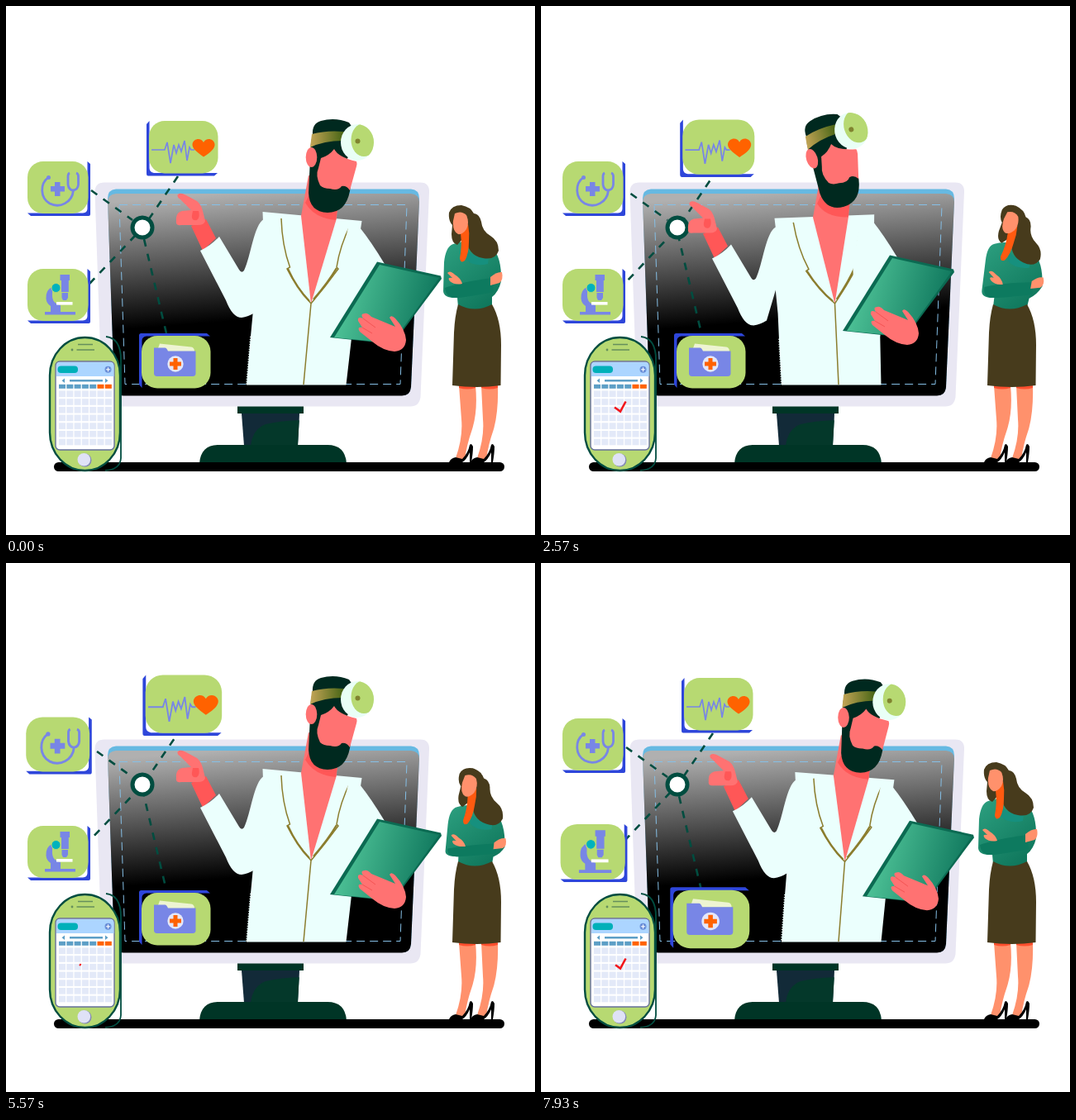
An HTML page that plays this animation: 640 px wide and 640 px high, repeating every 8 s.

```html
<!DOCTYPE html>
<html lang="en">
<head>
<meta charset="utf-8">
<title>Online doctor</title>
<style>
  html, body { margin: 0; width: 100%; height: 100%; overflow: hidden; background: #fff; }
  svg { display: block; width: 100vw; height: 100vh; }
  .link { fill: none; stroke: #004d40; stroke-width: 2.6; stroke-dasharray: 9 9; }
  .card { fill: #b7d972; }
  .edge { fill: #2e46da; }
  .ink { fill: #7886e6; }
  .line { fill: none; stroke: #7886e6; }
  .coat { fill: #ebfffd; }
  .seam { fill: none; stroke: #8b7d2e; stroke-width: 1.5; }
  .skin { fill: #ff7272; }
  .deep { fill: #ff5757; }
  .hair { fill: #00291f; }
  .brown { fill: #473b1c; }
  .peach { fill: #ff916c; }
  .orange { fill: #ff6200; }
  .pine { fill: #003526; }
</style>
</head>
<body>
<svg viewBox="0 0 640 640">
  <defs>
    <linearGradient id="screen" gradientUnits="userSpaceOnUse" x1="300" y1="224" x2="312" y2="378">
      <stop stop-color="#b0b0b0"/><stop offset="1"/>
    </linearGradient>
    <linearGradient id="board" x1="0" x2="1" y1=".4" y2=".6">
      <stop offset=".1" stop-color="#4cc095"/><stop offset="1" stop-color="#0c735a"/>
    </linearGradient>
    <linearGradient id="band">
      <stop stop-color="#c4a557"/><stop offset="1" stop-color="#456414"/>
    </linearGradient>
    <linearGradient id="knit" x1="0" y1="0" x2=".7" y2="1">
      <stop stop-color="#2da080"/><stop offset="1" stop-color="#0f775c"/>
    </linearGradient>
    <clipPath id="lens"><ellipse cx="425" cy="165" rx="20" ry="22"/></clipPath>
  </defs>

  <!-- monitor -->
  <path fill="#e9e7f3" d="M119 213.500H501Q512.500 213.500 512 225L501.500 473Q500 484.500 489 484.500H129Q117 484.500 116 473L107.500 225Q107.500 213.500 119 213.500Z"/>
  <path fill="#66b9e2" d="M133 221.500H490Q500 222 500 233L490 461Q489 471 479 471H142Q132 471 131 461L123 233Q123 222 133 221.500Z"/>
  <path fill="url(#screen)" d="M133 227H490Q500 228 500 237L490 461Q489 471.500 479 471.500H142Q132 471 131 461L123 237Q123 228 133 227Z"/>
  <path fill="none" stroke="#85bfe6" stroke-dasharray="10 6" d="M137 240.500H485L477 457.500H144Z"/>
  <path class="pine" d="M280 484.500H360V493H280Z"/>
  <path fill="#122a38" d="M285 493H355L353 532H288Z"/>
  <path fill="#04382a" d="M355 497L353 532H296Q298 512 314 506Q330 502 355 501Z"/>
  <path class="pine" d="M234 553Q236 531 257 531H389Q410 531 412 553Z"/>
  <rect x="58" y="552" width="545" height="11" rx="5.500"/>

  <!-- phone -->
  <g stroke="#004d40" stroke-width="2.400">
    <path fill="none" stroke-width="1.800" d="M121 400Q139 402 139 428V547Q138 561 120 562"/>
    <rect class="card" x="53" y="401" width="85" height="161" rx="42.500" ry="46"/>
  </g>
  <path fill="none" stroke="#658f5c" stroke-width="1.600" d="M87 409.500H105M85.500 416H107"/>
  <circle cx="80" cy="416" r="1.400" fill="#658f5c"/>
  <rect x="60" y="430" width="71" height="107" rx="5" fill="#fff" stroke="#66709b" stroke-width="1.400"/>
  <path fill="#acd5ff" d="M61 448V435Q61 431 65 431H126Q130.500 431 130.500 435V448Z"/>
  <rect x="62.500" y="435.500" width="24.500" height="8.500" rx="4" fill="#00b0b9"/>
  <circle cx="123.500" cy="439.800" r="4" fill="#6b8fd8"/>
  <path fill="none" stroke="#fff" d="M121 439.800H126M123.500 437.300V442.300"/>
  <path fill="#5d9fc6" d="M71 450.500V456L67.500 453.200ZM120 450.500V456L123.500 453.200ZM77 452H117V454.500H77Z"/>
  <g id="calendar"></g>
  <path id="check" fill="none" stroke="#f2161c" stroke-width="2.600" pathLength="1" d="M89 485.500L96 490.500L102.500 478.500"/>
  <circle cx="95.500" cy="549.500" r="8" fill="#8389b5"/>
  <circle cx="94.300" cy="548.800" r="7.800" fill="#dfe2f6"/>

  <!-- links -->
  <path class="link" d="M208 206L172 259"/>
  <path class="link" d="M103 223L153 259"/>
  <path class="link" d="M101 336L156 278"/>
  <path class="link" d="M194 396L167 282"/>
  <circle cx="165" cy="268" r="12" fill="#fff" stroke="#004d40" stroke-width="5"/>

  <!-- cards -->
  <g id="scope">
    <path class="edge" d="M98.500 188L102 191V252Q102 254 100 254H30L26 250.500H93Q98.500 250 98.500 245Z"/>
    <rect class="card" x="26" y="188" width="73.500" height="63" rx="19"/>
    <path class="ink" d="M59 213H65.500V218H71V224.500H65.500V230H59V224.500H54V218H59Z"/>
    <path class="line" stroke-width="2.800" d="M51 207.500C41 215 41 232 53 239C65 245 80 238 81.500 223M77 202Q75 203 75 206V216Q76 223 81.500 223Q87 222 87.500 216V206Q87.500 203 85 202"/>
    <circle class="ink" cx="51.500" cy="207.500" r="2.500"/>
  </g>
  <g id="micro">
    <path class="edge" d="M98.500 318L102 321V382Q102 384 100 384H30L26 380.500H93Q98.500 380 98.500 375Z"/>
    <rect class="card" x="26" y="318" width="73.500" height="63" rx="19"/>
    <path class="ink" d="M65.500 325H77V332H75.800V346H67V332H65.500ZM67.500 347H75V353L73 356H69L67.500 353ZM56 340Q48 343 48.500 354Q49 360 54 363V370H47V373.500H84V370H66V362Q55 360 56 348Z"/>
    <circle cx="60.500" cy="341" r="5.500" fill="#00b2bd" stroke="#b7d972"/>
    <rect x="61" y="358" width="19.500" height="3.600" fill="#fff"/>
  </g>
  <g id="heart">
    <path class="edge" d="M173.500 139L170 143V203Q170 205.500 172 205.500H252L256 202H179Q173.500 201 173.500 196Z"/>
    <rect class="card" x="173" y="139" width="83.500" height="63.500" rx="19"/>
    <path class="line" stroke-width="1.700" d="M176 174H192L195 165L199 190L203 168L206 178L209 168L212 176L216 163L219 187L222 171L224 174H228"/>
    <path class="orange" d="M239 182.500C230 176 225 172 225.500 167C227 160 236 159 239 165C242 159 251 160 252.500 167C253 172 248 177 239 182.500Z"/>
  </g>
  <g id="folder">
    <path class="edge" d="M164.500 462L161 458V398.500Q161 396 163.500 396H243L247 399.500H170Q164.500 400 164.500 405Z"/>
    <rect class="card" x="164" y="399" width="83.500" height="63.500" rx="19"/>
    <path fill="#edf4d2" d="M184 414L186 408.500L224 412.500Q228 413 228 418H184Z"/>
    <path class="ink" d="M179 413.500H192Q194 413 196 417.500H229.500V445Q229 448 226 448H182.500Q179.500 448 179 445Z"/>
    <circle cx="205" cy="433" r="9.700" fill="#e4e7fa"/>
    <path class="orange" d="M202.500 426H207.500V430.500H212V435.500H207.500V440H202.500V435.500H198V430.500H202.500Z"/>
  </g>

  <!-- doctor -->
  <g id="doctor">
    <path class="coat bend" d="M310.500 249L430.500 260L429 270L442 320L418 402L411.500 458.500L291 458.500L295 410L299 368L302 300L311 262Z"/>
    <path class="bend" fill="none" stroke="#ebfffd" stroke-width="4" stroke-dasharray="1 2" d="M297 400L292 458"/>
    <path class="skin bend" d="M366 205L357 254L369 360L400 257L403 212Z"/>
    <path class="deep bend" d="M366 230L362 238Q373 257 399 259L402 240Z"/>
    <g class="seam">
      <path class="bend" d="M333 257Q334 290 343.500 316L340 318Q350 338 369 360L360 458"/>
      <path class="bend" d="M417 264Q404 290 400 316L402 318Q386 340 369 360"/>
      <path class="bend" stroke-width="2.400" d="M341 318Q352 342 367 357M400 317Q390 334 372 355"/>
    </g>
    <g id="pointing">
      <path class="deep" d="M224 266L242 258L254 281L238 296Z"/>
      <path class="skin" d="M208 228Q211 225 218 229L231 236Q236 240 238 248L241 260Q240 265 232 265L212 265Q205 266 206 260Q205 250 213 248L224 247L211 234Q206 231 208 228Z"/>
      <path class="deep" d="M226 248L233 248Q235 256 231 259Q224 260 225 253Z"/>
      <path class="coat" d="M312 258C300 264 296 304 288 320Q285 324 282 319L258 279Q248 290 235 296L266 356Q274 377 285 377Q293 376 301 371L322 300Z"/>
    </g>
    <g id="holding">
      <path class="coat" d="M415 262L428 268Q441 284 458 312L440 380L408 396L404 318Z"/>
      <path fill="#0b6a52" d="M449 309.500L526 326.500L527 330L468 409L392 401Z"/>
      <path fill="url(#board)" d="M452 313L524 329L467 408L397 401Z"/>
      <path class="skin" d="M434 372Q437 371 442 376L471 388L464 377Q466 373 471 378Q483 391 484 404Q483 417 470 418Q456 417 443 406L428 394Q424 388 431 389L426 381Q425 375 432 378Q428 372 434 372Z"/>
      <path fill="none" stroke="#f45454" d="M432 378L447 389M431 389L443 396"/>
    </g>
    <g id="head">
      <path class="hair" d="M371 156Q370 142 381 139Q398 134 415 141L428 160L412 186L420 190L416 224Q411 250 389 250Q367 249 366 226L369 165Z"/>
      <path class="skin" d="M381 184Q391 181 397 173Q402 183 424 188Q425 190 424 194L416 223Q412 217 406 218Q402 224 392 221Q384 221 380 217Q374 205 378 196Z"/>
      <ellipse class="skin" cx="369.500" cy="183" rx="6.800" ry="12"/>
      <path fill="url(#band)" d="M370 155Q388 150 409 152L407 163Q385 163 368 171Z"/>
      <ellipse cx="425" cy="165" rx="20" ry="22" fill="#e9fff6"/>
      <ellipse cx="433" cy="162" rx="15.500" ry="20" fill="#b7d972" clip-path="url(#lens)"/>
      <circle cx="425.500" cy="163.500" r="3" fill="#80832f"/>
    </g>
  </g>

  <!-- visitor -->
  <g id="visitor">
    <path class="peach" d="M548 459H568Q571 490 564 512Q557 532 555 549L544 547Q553 522 551 500ZM575 459H595Q596 490 590 512Q583 532 581 549L570 547Q579 522 577 500Z"/>
    <path fill="#ff4f2e" d="M548 458H568V462Q558 465 548 462ZM575 458H595V462Q585 465 575 462Z"/>
    <path id="shoe" d="M536 552Q538 547 544 546L552 548Q559 541 561 531Q563 528 565 533Q565 541 563 552H561L561 540Q557 549 552 552Z"/>
    <use href="#shoe" x="26"/>
    <path class="sway" fill="url(#knit)" d="M541 288Q532 291 530 310L529 345Q530 354 546 353L547 364Q567 371 588 364L588 352Q596 346 599 333Q600 303 587 291Q560 280 541 288Z"/>
    <path class="sway" fill="#0d7a5f" d="M531 341Q550 334 588 329L590 346Q560 352 546 353Q532 354 531 341Z"/>
    <path class="sway" fill="#16907e" d="M558 296Q570 306 584 304L583 312Q566 316 557 307Z"/>
    <path class="peach sway" d="M534 323Q537 319 543 325Q550 329 552 336Q543 338 537 333Q533 328 540 329Z"/>
    <path class="peach sway" d="M586 328Q594 321 600 322Q602 331 597 335L586 338Z"/>
    <path class="brown" d="M547 361Q567 372 588 361Q599 380 599 410L598.500 459Q570 463 540 459L542 395Q543 375 547 361Z"/>
    <g id="hairdo">
      <path class="brown" d="M551 241Q539 241 536 250Q535 260 540 265L539 276Q539 287 546 289L556 278Q558 302 577 305Q592 308 596 296Q596 284 586 278Q576 272 575 261Q573 252 566 251Q562 243 551 241Z"/>
      <path fill="#ff5a10" d="M551 268L559 264Q561 275 560 285Q560 300 555 308Q550 312 549 305Q552 290 550 275Z"/>
      <path class="peach" d="M543 251Q551 247 557 253Q561 262 557 270Q552 277 547 276Q540 273 541 260Z"/>
    </g>
  </g>
</svg>
<script>
const LOOP = 8000, CYCLE = 3540;
const $ = id => document.getElementById(id);
const clamp = x => Math.min(1, Math.max(0, x));
const cubic = x => (x = clamp(x)) < .5 ? 4 * x ** 3 : 1 - 4 * (1 - x) ** 3;
const smooth = (t, from, to) => { const x = clamp((t - from) / (to - from)); return x * x * (3 - 2 * x); };

// Lean over, stay, come back, lean again
const swing = (t, start) => [0, 3535, 7115].reduce((sum, at, i) =>
  sum + (i % 2 ? -1 : 1) * cubic((t - start - at) / 1650), 0);

const cells = [];
const cell = (col, y, h, color) =>
  cells.push(`<rect x="${64 + col * 9.3}" y="${y}" width="8" height="${h}" fill="${color}"/>`);
for (let col = 0; col < 7; col++) {
  cell(col, 457.8, 5, col > 4 ? '#ff6200' : '#5d9fc6');
  for (let row = 0; row < 7; row++) cell(col, 465.5 + row * 9.7, 7.6, '#e3e9f8');
}
$('calendar').innerHTML = cells.join('');

// [id, centre x, centre y, time of the largest size]
const cards = [
  ['folder', 204, 429, 860], ['micro', 64, 351, 1210],
  ['scope', 64, 221, 1590], ['heart', 213, 172, 2110]
];
const links = document.querySelectorAll('.link');
const collect = name => [...document.querySelectorAll(name)].map(el => [el, el.getAttribute('d')]);
const bends = collect('.bend'), sways = collect('.sway');

function warp(list, move) {
  for (const [el, d] of list)
    el.setAttribute('d', d.replace(/([\d.]+) ([\d.]+)/g, (m, x, y) =>
      move(+x, +y).map(n => n.toFixed(2)).join(' ')));
}
const place = (id, x, y, turn = '') => $(id).setAttribute('transform', `translate(${x} ${y}) ${turn}`);

function drawDoctor(t) {
  const p = clamp(swing(t, 315)), arc = Math.sin(Math.PI * p), dip = 9 * arc;
  warp(bends, (x, y) => {
    const w = clamp((458 - y) / 203);
    return [x - 28 * p * w, y + (dip - .13 * p * (x - 370)) * w];
  });
  place('pointing', -28 * p, 9.5 * p + dip);
  place('holding', -27 * p, -8 * p + dip);
  place('head', -22.5 * p, -7.5 * p + 13 * arc, `rotate(${-17.5 * p ** 1.4} 390 250)`);
}

function drawVisitor(t) {
  const p = clamp(swing(t, 1250)), dip = 8 * Math.sin(Math.PI * p);
  warp(sways, (x, y) => {
    const w = clamp((362 - y) / 30);
    return [x + 8 * p * w, y + (dip + .12 * p * (x - 550)) * w];
  });
  place('hairdo', 11 * p, dip, `rotate(${15.5 * p} 558 290)`);
}

function drawCards(t) {
  for (const [id, x, y, peak] of cards) {
    const d = clamp(Math.abs(t % CYCLE - peak) / 800);
    const size = 1 + .11 * Math.cos(d * Math.PI / 2) ** 2;
    place(id, x, y, `scale(${size}) translate(${-x} ${-y})`);
  }
  links.forEach(el => el.style.strokeDashoffset = t * .01137);
}

function drawCheck(t) {
  const u = t % 4850, from = smooth(u, 3000, 3560), to = smooth(u, 600, 1250);
  $('check').style.visibility = to > from ? 'visible' : 'hidden';
  $('check').setAttribute('stroke-dasharray', `0 ${from} ${to - from} 2`);
}

const begin = performance.now();
function frame() {
  const t = (performance.now() - begin) % LOOP;
  drawDoctor(t);
  drawVisitor(t);
  drawCards(t);
  drawCheck(t);
  requestAnimationFrame(frame);
}
frame();
</script>
</body>
</html>
```
